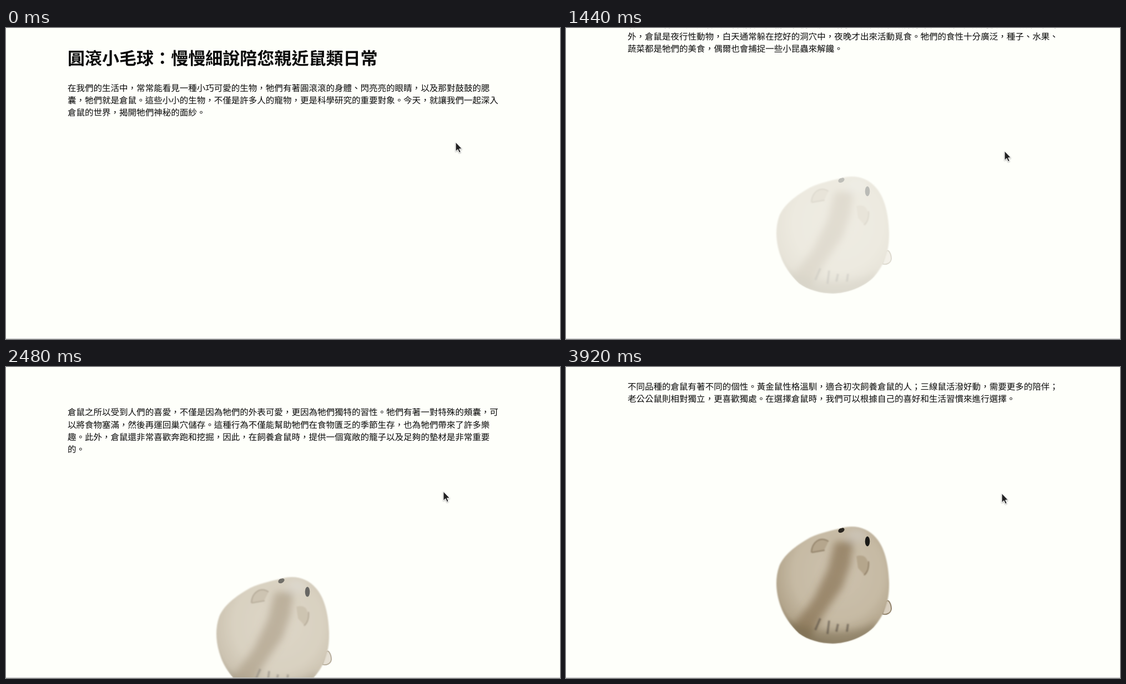
Recreate the animation shown at these times as an HTML page. Size 998 by 561 pixels, loop 4000 ms.

```html
<!DOCTYPE html>
<html lang="zh-Hant-TW">
<head>
<meta charset="utf-8">
<style>
  html, body { margin: 0; width: 100%; height: 100%; overflow: hidden; background: #fefffa; }
  svg { display: block; width: 998px; height: 561px; }
  text {
    font: 15.52px "Noto Sans CJK TC", "Noto Sans CJK", sans-serif;
    fill: #0a0a0a;
    text-rendering: geometricPrecision;
  }
  .title { font-size: 31.04px; font-weight: 700; }
</style>
</head>
<body>
<svg viewBox="0 0 998 561">
  <defs>
    <radialGradient id="fur" cx=".55" cy=".4" r=".66">
      <stop offset="0" stop-color="#cdc2ae"/>
      <stop offset=".6" stop-color="#c6baa4"/>
      <stop offset=".85" stop-color="#b3a58c"/>
      <stop offset="1" stop-color="#86775d"/>
    </radialGradient>
    <filter id="soft" x="-50%" y="-50%" width="200%" height="200%"><feGaussianBlur stdDeviation="7"/></filter>
    <filter id="edge" x="-10%" y="-10%" width="120%" height="120%"><feGaussianBlur stdDeviation=".9"/></filter>
    <filter id="shade" x="-50%" y="-50%" width="220%" height="220%">
      <feDropShadow dx="0" dy="1" stdDeviation="1" flood-opacity=".4"/>
    </filter>
    <path id="body" d="M497 3C520 -4 545 4 558 20C573 36 581 66 582 100C583 134 574 160 554 182C541 195 521 205 500 209C475 215 440 208 420 193C404 178 392 160 387 145C378 120 376 95 384 72C392 52 412 36 440 20C460 11 480 7 497 3Z"/>
    <clipPath id="bodyClip"><use href="#body"/></clipPath>
    <g id="hamster">
      <path d="M576 136C581 129 586 141 586 149C585 157 577 160 570 158Z" fill="#d9cfbf" stroke="#94866e" stroke-width="2"/>
      <use href="#body" fill="url(#fur)" filter="url(#edge)"/>
      <g clip-path="url(#bodyClip)">
        <g filter="url(#soft)">
          <path d="M484 28L518 26L512 70L498 110L470 150L436 205L408 180L446 130L472 76Z" fill="#7d6744" opacity=".6"/>
          <path d="M398 168C440 194 520 200 562 170L550 222L400 222Z" fill="#75664c" opacity=".5"/>
          <ellipse cx="524" cy="17" rx="18" ry="12" fill="#cbc3b5"/>
        </g>
        <g filter="url(#edge)">
          <path d="M442 47C443 29 457 17 473 27L465 43Z" fill="#b5a68d"/>
          <path d="M442 47C443 29 457 17 473 27M443 47L466 43" fill="none" stroke="#8d7d64" stroke-width="2"/>
          <path d="M523 54C543 47 550 68 538 88L526 75Z" fill="#b5a68c"/>
          <path d="M545 63C546 75 543 83 537 88" fill="none" stroke="#907f65" stroke-width="2"/>
          <path d="M474 170L471 194M458 166L449 187M490 176L487 190M508 176L506 190" fill="none" stroke="#4c453b" stroke-width="4" opacity=".5"/>
        </g>
        <ellipse cx="496" cy="7" rx="6" ry="4" transform="rotate(-28 496 7)" fill="#29251f"/>
        <ellipse cx="543" cy="27" rx="4.3" ry="9" fill="#1b1a18"/>
      </g>
    </g>
  </defs>
  <rect width="998" height="561" fill="#fefffa"/>
  <g id="page"><text class="title" x="111" y="66.3">圓滾小毛球：慢慢細說陪您親近鼠類日常</text></g>
  <rect y="560" width="998" height="1" fill="#c6c7c6"/>
  <path id="cursor" d="M0 0V16.5L3.8 13L6.5 19L9.2 17.8L6.6 12H11.5Z" fill="#202020" stroke="#fff" stroke-width="1" filter="url(#shade)"/>
</svg>
<script>
  const LOOP = 4000, STEP = 80, FADE = 500;
  const LINE = 22.2, GAP_ABOVE_HAMSTER = 224.6, GAP_BELOW_HAMSTER = 475;

  const sections = [
    { fadeStart: 560, lines: [
      "在我們的生活中，常常能看見一種小巧可愛的生物，牠們有著圓滾滾的身體、閃亮亮的眼睛，以及那對鼓鼓的腮",
      "囊，牠們就是倉鼠。這些小小的生物，不僅是許多人的寵物，更是科學研究的重要對象。今天，就讓我們一起深入",
      "倉鼠的世界，揭開牠們神秘的面紗。"] },
    { fadeStart: 1385, lines: [
      "倉鼠，又名地鼠，是倉鼠亞科動物的通稱。牠們的體型嬌小，大多數種類都分布在亞洲，少數則棲息於歐洲。在野",
      "外，倉鼠是夜行性動物，白天通常躲在挖好的洞穴中，夜晚才出來活動覓食。牠們的食性十分廣泛，種子、水果、",
      "蔬菜都是牠們的美食，偶爾也會捕捉一些小昆蟲來解饞。"] },
    { fadeStart: 2330, lines: [
      "倉鼠之所以受到人們的喜愛，不僅是因為牠們的外表可愛，更因為牠們獨特的習性。牠們有著一對特殊的頰囊，可",
      "以將食物塞滿，然後再運回巢穴儲存。這種行為不僅能幫助牠們在食物匱乏的季節生存，也為牠們帶來了許多樂",
      "趣。此外，倉鼠還非常喜歡奔跑和挖掘，因此，在飼養倉鼠時，提供一個寬敞的籠子以及足夠的墊材是非常重要",
      "的。"] },
    { fadeStart: 3300, lines: [
      "不同品種的倉鼠有著不同的個性。黃金鼠性格溫馴，適合初次飼養倉鼠的人；三線鼠活潑好動，需要更多的陪伴；",
      "老公公鼠則相對獨立，更喜歡獨處。在選擇倉鼠時，我們可以根據自己的喜好和生活習慣來進行選擇。"] }
  ];

  // Each swipe scrolls the page and slows to a stop.
  const swipes = [
    { start: 560, duration: 284, distance: 523 },
    { start: 1280, duration: 400, distance: 525 },
    { start: 2200, duration: 480, distance: 564 },
    { start: 2910, duration: 590, distance: 715 }
  ];

  const page = document.getElementById("page");
  const cursor = document.getElementById("cursor");
  const add = (tag, attributes) => {
    const node = document.createElementNS("http://www.w3.org/2000/svg", tag);
    for (const name in attributes) node.setAttribute(name, attributes[name]);
    return page.appendChild(node);
  };

  let y = 113.5;
  for (const section of sections) {
    section.lines.forEach((line, i) => add("text", { x: 111, y: y + i * LINE }).textContent = line);
    y += (section.lines.length - 1) * LINE + GAP_ABOVE_HAMSTER;
    section.hamster = add("use", { href: "#hamster", y });
    y += GAP_BELOW_HAMSTER;
  }

  const progress = (t, start, duration) => Math.min(1, Math.max(0, (t - start) / duration));
  const easeOut = (u, power) => 1 - (1 - u) ** power;

  function draw(now) {
    const t = Math.floor(now % LOOP / STEP) * STEP;
    const scroll = swipes.reduce((sum, { start, duration, distance }) =>
      sum + distance * easeOut(progress(t, start, duration), 2), 0);
    page.setAttribute("transform", `translate(0 ${-scroll})`);

    const glide = progress(t, 0, 480), drift = progress(t, 1440, 2480);
    cursor.setAttribute("transform",
      `translate(${810 - 20 * glide - 5 * drift} ${206 + 16 * glide + 6 * drift})`);

    for (const { hamster, fadeStart } of sections)
      hamster.setAttribute("opacity", easeOut(progress(t, fadeStart, FADE), 3));
  }

  const origin = performance.now();
  function tick() {
    draw(performance.now() - origin);
    requestAnimationFrame(tick);
  }
  tick();
</script>
</body>
</html>
```
